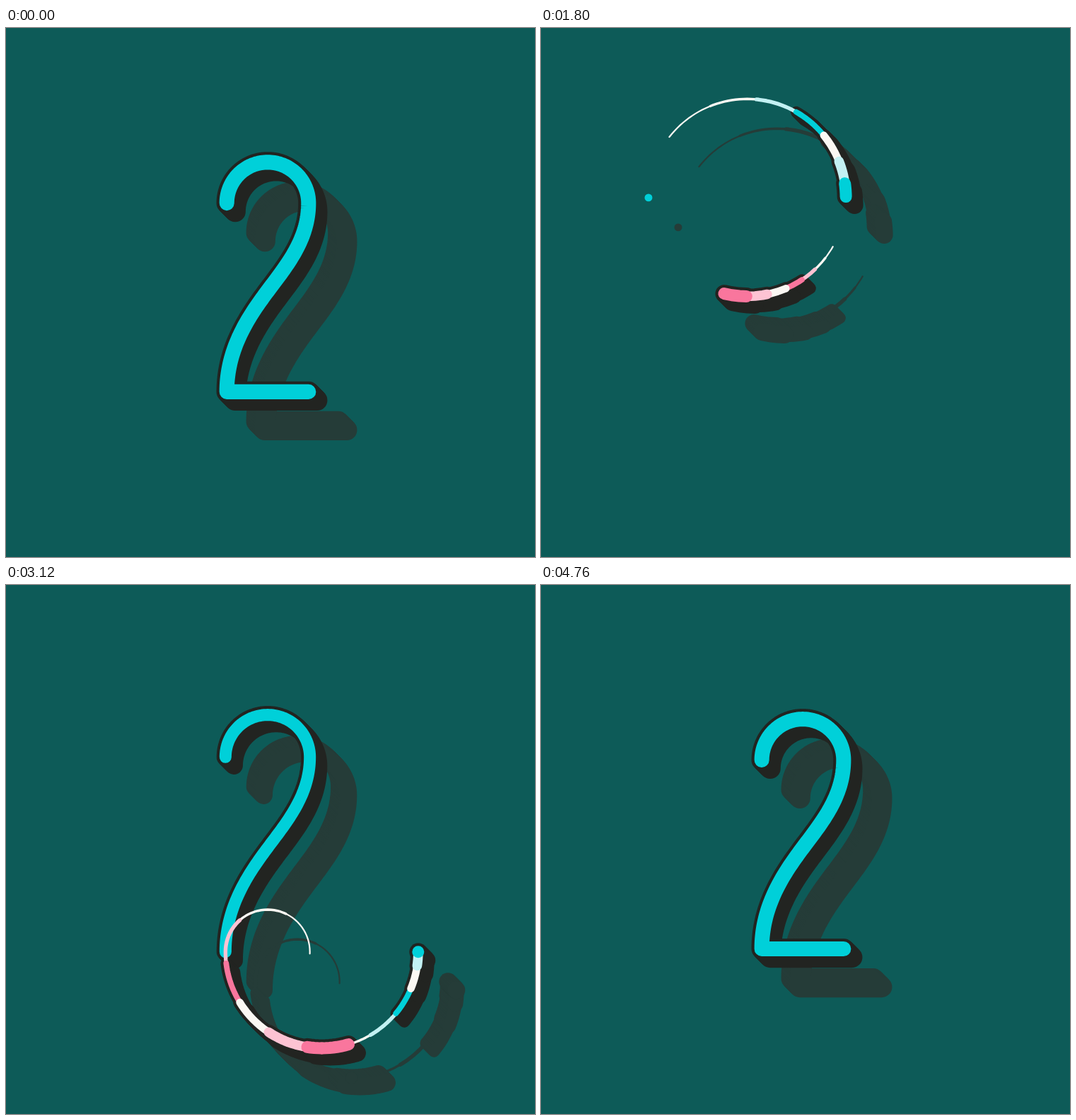
An HTML page with a canvas that plays this animation: 748 by 748 pixels, repeating every 4800 ms.

```html
<!DOCTYPE html>
<html lang="en">
<head>
<meta charset="utf-8">
<title>Two</title>
<style>
html, body { margin: 0; width: 100%; height: 100%; overflow: hidden; background: #0d5b58; }
canvas { display: block; width: 748px; height: 748px; }
</style>
</head>
<body>
<canvas width="748" height="748"></canvas>
<script>
const ctx = document.querySelector('canvas').getContext('2d');
const LOOP = 4800, LAG = 40, BANDS = 7, SHADOW = 42, DEPTH = 12, DOT_LIFE = 460;
const BG = '#0d5b58', DARK = '#222421', SHADE = '#253c38', WHITE = '#fbf8f3';
const CYAN = ['#00d0d9', '#c3f1f3', WHITE], PINK = ['#f9769d', '#fdc3d3', WHITE];

const clamp = v => Math.max(0, Math.min(1, v));
const ramp = (t, from, to) => clamp((t - from) / (to - from));
const linear = x => x;
const easeIn = p => x => x ** p;
const easeOut = p => x => 1 - (1 - x) ** p;

// Paths map 0..1 to a point around the middle of the digit
const H = 138.5, W = 60, BIG = 137;
const arc = (cx, cy, r, from, sweep) => u => {
  const a = (from + sweep * u) * Math.PI / 180;
  return [cx + r * Math.cos(a), cy + r * Math.sin(a)];
};
const cubic = (a, b, c, d) => u => {
  const v = 1 - u;
  return [0, 1].map(i => v * v * v * a[i] + 3 * v * v * u * b[i] + 3 * v * u * u * c[i] + u * u * u * d[i]);
};
const upper = cubic([W, -H], [W, -85], [28, -47], [0, -9.5]);
const lower = cubic([0, -9.5], [-28, 28], [-W, 75], [-W, H]);
const spine = u => u < 0.5 ? upper(u * 2) : lower(u * 2 - 1);
const base = u => [-W + 2 * W * u, H];
const ringTop = arc(0, -H, W, 0, -360);
const ringLow = arc(0, H, W, 180, -360);
const loopTop = (from, sweep) => arc(W - BIG, -H, BIG, from, sweep);
const lowOut = arc(BIG - W, H, BIG, 180, -180);
const lowBack = arc(BIG - W, H, BIG, 0, -180);

// A route is a chain of timed legs; dots mark fractions of a leg
const leg = (path, from, to, ease = linear, dots = []) => ({ path, from, to, ease, dots });

const digit = [
  leg(arc(0, -H, W, 180, 180), 2400, 2700),
  leg(spine, 2700, 3000),
  leg(base, 4095, 4420)
];
const trails = [
  {
    tones: CYAN,
    legs: [
      leg(loopTop(180, 180), 1475, 1810, easeOut(1.6), [0]),
      leg(ringTop, 1810, 2110),
      leg(spine, 2110, 2375),
      leg(ringLow, 2375, 2730, linear, [0, 0.25, 0.5, 0.75]),
      leg(lowOut, 2730, 3080, easeOut(1.4)),
      leg(lowBack, 3240, 3650, easeIn(2.9)),
      leg(lowOut, 3650, 4000, easeOut(1.4), [0.5, 1]),
      leg(lowBack, 4120, 4450, easeIn(2))
    ]
  },
  {
    tones: PINK,
    legs: [
      leg(loopTop(0, 360), 1230, 2350, easeIn(1.85), [0.75]),
      leg(ringTop, 2350, 2562),
      leg(spine, 2562, 2735, linear, [0.5]),
      leg(ringLow, 2735, 2950),
      leg(lowOut, 2950, 3240, linear, [0.5, 1]),
      leg(lowBack, 3240, 3680),
      leg(base, 3690, 4170)
    ]
  }
];

// Distance travelled, counted in legs
const headAt = (legs, t) =>
  legs.reduce((sum, l) => sum + l.ease(ramp(t, l.from, l.to)), 0);

function timeAt({ from, to, ease }, f) {
  let a = 0, b = 1;
  for (let i = 0; i < 20; i++) {
    const m = (a + b) / 2;
    if (ease(m) < f) a = m; else b = m;
  }
  return from + (to - from) * a;
}

for (const tr of trails) {
  tr.dots = tr.legs.flatMap((l, i) => l.dots.map(f => ({ u: i + f, time: timeAt(l, f) })));
}

const scaleAt = t => 0.93 + 0.0000185 * (6600 - t);

function pointAt(legs, u, s) {
  const i = Math.min(legs.length - 1, Math.floor(u));
  const [x, y] = legs[i].path(u - i);
  return [370 + s * x, 381 + s * y];
}

function slice(legs, u0, u1, s) {
  const n = 80, line = new Path2D();
  const lineTo = u => {
    const [x, y] = pointAt(legs, u, s);
    line.lineTo(x + 0.01, y);
  };
  line.moveTo(...pointAt(legs, u0, s));
  for (let k = Math.floor(u0 * n) + 1; k < u1 * n; k++) lineTo(k / n);
  lineTo(u1);
  return line;
}

// The digit lives past the end of the loop, so t may exceed LOOP
function addDigit(items, t) {
  if (t <= 2400 || t >= 6120) return;
  items.push({
    line: slice(digit, 0, headAt(digit, t), scaleAt(t)),
    w: (17 + 4 * ramp(t, 4200, 4700) + ramp(t, 4700, 5840)) * (1 - ramp(t, 5840, 6120)),
    rim: 4.1 * (1 - ramp(t, 5750, 6000)),
    depth: DEPTH * (1 - ramp(t, 5900, 6120)),
    color: CYAN[0]
  });
}

function addTrail(items, { tones, legs, dots }, t) {
  const s = scaleAt(t), start = legs[0].from, end = legs[legs.length - 1].to;
  const swell = ramp(t, start - 150, start);
  for (let i = BANDS - 1; i >= 0; i--) {
    const u1 = headAt(legs, t - i * LAG), u0 = headAt(legs, t - (i + 1) * LAG);
    const isHead = i === 0 && swell > 0 && t < end;
    if (u1 - u0 < 1e-4 && !isHead) continue;
    const w = swell * (2.2 + 14.8 * (1 - i / (BANDS - 1)) ** 1.4);
    const k = clamp((w - 5.4) / 2.4);
    items.push({
      line: slice(legs, u0, u1, s), w, rim: 4 * k, depth: DEPTH * k,
      color: tones[i < BANDS - 1 ? i % 3 : 2]
    });
  }
  for (const { u, time } of dots) {
    const age = t - time;
    if (age < 0 || age > DOT_LIFE) continue;
    const w = 17 * (1 - (age / DOT_LIFE) ** 3);
    items.push({ line: slice(legs, u, u, s), w, rim: 0, depth: 0, color: tones[0] });
  }
}

function stroke(line, w, color) {
  if (w <= 0) return;
  ctx.lineWidth = w;
  ctx.strokeStyle = color;
  ctx.stroke(line);
}

function extrude(items, offset, color) {
  for (const { line, w, rim, depth } of items) {
    const n = Math.ceil(depth);
    for (let i = 0; i <= n; i++) {
      const d = offset + (n ? depth * i / n : 0);
      ctx.setTransform(1, 0, 0, 1, d, d);
      stroke(line, w + 2 * rim, color);
    }
  }
  ctx.setTransform(1, 0, 0, 1, 0, 0);
}

function draw(t) {
  const items = [];
  addDigit(items, t);
  addDigit(items, t + LOOP);
  for (const tr of trails) addTrail(items, tr, t);
  ctx.fillStyle = BG;
  ctx.fillRect(0, 0, 748, 748);
  ctx.lineCap = ctx.lineJoin = 'round';
  extrude(items, SHADOW, SHADE);
  extrude(items.filter(it => it.depth > 0), 0, DARK);
  for (const it of items) stroke(it.line, it.w, it.color);
}

const begin = performance.now();
function tick() {
  draw((performance.now() - begin) % LOOP);
  requestAnimationFrame(tick);
}
tick();
</script>
</body>
</html>
```
